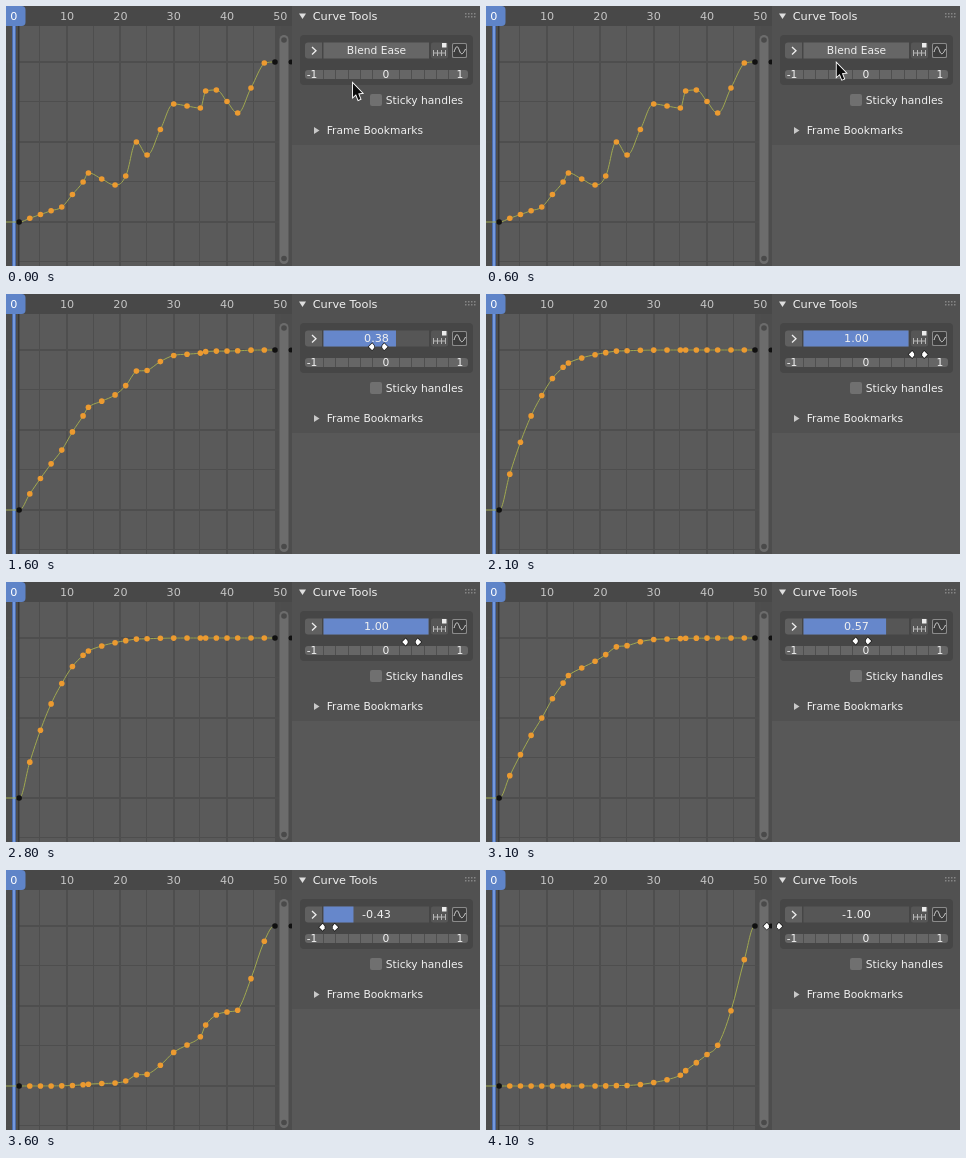
An HTML page with a canvas for the animation above (4200 ms loop, 474 by 260 pixels).

```html
<!DOCTYPE html>
<html>
<head>
<meta charset="utf-8">
<style>
html, body { margin: 0; width: 100%; height: 100%; overflow: hidden; background: #585858; }
canvas { display: block; }
</style>
</head>
<body>
<canvas id="stage" width="474" height="260"></canvas>
<script>
const c = document.getElementById('stage').getContext('2d');
const LOOP = 4200, STEP = 100, DRAG = 1100, TURN = 2200;
const LEFT = 13, BASE = 216, TOP = 56, SPAN = 48, UNIT = 53;

// bends of the curve: keyframe number, height above the base
const bends = [[1, 0], [9, 15], [13, 40], [14, 49], [19, 37], [21, 46], [23, 80], [25, 67],
  [30, 118], [35, 114], [36, 131], [38, 132], [42, 109], [47, 159], [49, 160]];

const mix = (a, b, k) => a + (b - a) * k;
const frameX = f => 7.8 + f * 5.33;

// keys sit on the bends and evenly between them, about two frames apart
const keys = bends.slice(1).flatMap(([f, h], i) => {
  const [f0, h0] = bends[i];
  const n = Math.round((f - f0) / 2.1) || 1;
  return Array.from({ length: n }, (_, j) => [mix(f0, f, j / n), BASE - mix(h0, h, j / n)]);
});
keys.push([SPAN + 1, TOP]);

function rect(x, y, w, h, fill, r = 0) {
  c.fillStyle = fill;
  c.beginPath();
  c.roundRect(x, y, w, h, r);
  c.fill();
}

function poly(points, fill, stroke, width = 1) {
  c.beginPath();
  points.forEach(p => c.lineTo(...p));
  if (fill) c.closePath();
  if (stroke) {
    c.strokeStyle = stroke;
    c.lineWidth = width;
    c.stroke();
  }
  if (fill) {
    c.fillStyle = fill;
    c.fill();
  }
}

function dot(x, y, r, fill) {
  c.fillStyle = fill;
  c.beginPath();
  c.arc(x, y, r, 0, 7);
  c.fill();
}

function text(s, x, y, size = 10.7, align = 'left', fill = '#f0f0f0') {
  c.font = size + 'px "DejaVu Sans", sans-serif';
  c.textAlign = align;
  c.fillStyle = fill;
  c.fillText(s, x, y);
}

function ease(t, from, to, power = 1) {
  const k = Math.max(0, Math.min(1, (t - from) / (to - from))) ** power;
  return k * k * (3 - 2 * k);
}

// approach the slider, drag right, then drag back to the left
function pointerAt(t) {
  if (t < DRAG) {
    const k = ease(t, 0, 900);
    return [mix(347, 352, k), mix(77.5, 50, k)];
  }
  if (t < TURN) {
    const k = ease(t, DRAG, TURN, 1.45);
    return [mix(352, 436, k), mix(50, 61, k)];
  }
  const k = ease(t, TURN, 4300);
  return [mix(436, 283, k), mix(61, 56, k)];
}

// half a sigmoid pulls each key towards the right or left neighbour
function blend([frame, y], factor) {
  const t = (frame - 1) / SPAN;
  const x = frameX(frame);
  if (t === 0 || t === 1) return [x, y];
  const s = factor < 0 ? 1 - t : t;
  const pull = 2 / (1 + ((1 + s) / (1 - s)) ** (5 * Math.abs(factor)));
  return [x, mix(factor < 0 ? BASE : TOP, y, pull)];
}

function slope(p, i) {
  if (!i || i === p.length - 1) return 0;
  const [a, b, d] = [p[i - 1], p[i], p[i + 1]];
  if ((b[1] - a[1]) * (d[1] - b[1]) <= 0) return 0;
  return (d[1] - a[1]) / (d[0] - a[0]);
}

function drawCurve(factor) {
  const p = keys.map(k => blend(k, factor));
  c.beginPath();
  c.moveTo(0, BASE);
  c.lineTo(...p[0]);
  for (let i = 1; i < p.length; i++) {
    const [a, b] = [p[i - 1], p[i]];
    const h = (b[0] - a[0]) * 0.39;
    const clamp = y => Math.max(Math.min(a[1], b[1]), Math.min(Math.max(a[1], b[1]), y));
    c.bezierCurveTo(a[0] + h, clamp(a[1] + slope(p, i - 1) * h),
      b[0] - h, clamp(b[1] - slope(p, i) * h), ...b);
  }
  c.strokeStyle = '#a0a850';
  c.lineWidth = 1;
  c.stroke();
  p.forEach(([x, y], i) => dot(x, y, 2.8, i && i < p.length - 1 ? '#ec9a30' : '#101010'));
}

function drawGraph(factor) {
  rect(0, 0, 286, 260, '#4d4d4d');
  rect(LEFT, 20, 256, 240, '#5a5a5a');
  for (let f = 5; f <= 50; f += 5) rect(Math.round(frameX(f)) - 1, 20, f % 10 ? 1 : 2, 240, '#4e4e4e');
  for (let i = 0; i < 6; i++) rect(0, TOP + i * 40 - 1, 274, i % 2 ? 1 : 2, '#4e4e4e');
  rect(LEFT - 1, 20, 1.5, 240, '#383838');
  rect(0, 0, 286, 20, '#484848');
  for (let f = 10; f <= 50; f += 10) text(f, frameX(f), 13.5, 11.2, 'center', '#c4c4c4');
  rect(6, 18, 4, 242, '#4c6cab');
  rect(7, 18, 2, 242, '#7398de');
  rect(0, 0, 19.5, 20, '#5f84c8', [0, 4, 4, 0]);
  text('0', 7.8, 13.5, 11.2, 'center', '#fff');
  drawCurve(factor);
  rect(273.5, 29, 9, 229, '#6c6c6c', 4.5);
  for (const y of [34, 252.5]) dot(278, y, 2.8, '#4a4a4a');
  dot(285, TOP, 2.5, '#101010');
}

function drawSlider(dragging, factor) {
  rect(317.5, 36.5, 105.5, 16, dragging ? '#565656' : '#666');
  if (dragging) rect(317.5, 36.5, 52.5 * (1 + factor), 16, '#6687cb');
  text(dragging ? factor.toFixed(2) : 'Blend Ease', 370.5, 48.3, dragging ? 11.2 : 10.7, 'center');
}

function drawIcons() {
  rect(425, 36.5, 17, 16, '#565656', 2);
  for (let x = 427; x < 441; x += 4) rect(x, 44, 1, 6, '#b5b5b5');
  rect(427, 46.5, 13, 1, '#b5b5b5');
  rect(436, 37, 4.5, 4.5, '#ececec');

  rect(446, 37, 15, 15, '#8a8a8a', 1.5);
  rect(447, 38, 13, 13, '#3c3c3c', 1);
  c.beginPath();
  c.moveTo(448, 46);
  c.bezierCurveTo(451, 37, 452, 41, 454, 46);
  c.bezierCurveTo(456, 50, 458, 46, 459.5, 43);
  c.strokeStyle = '#d8d8d8';
  c.lineWidth = 1;
  c.stroke();
}

function drawPanel(dragging, factor) {
  rect(286, 0, 188, 260, '#585858');
  rect(286, 0, 188, 139, '#515151');
  poly([[293, 7.5], [300, 7.5], [296.5, 13]], '#dedede');
  text('Curve Tools', 306.7, 14, 11.3);
  for (let i = 0; i < 8; i++) rect(459 + (i % 4) * 3, i < 4 ? 7 : 10, 1.5, 1.5, '#858585');

  rect(294, 29, 173, 50, '#464646', 4);
  rect(299, 36.5, 17, 16, '#606060', [3, 0, 0, 3]);
  poly([[306, 41], [310, 44.7], [306, 48.5]], null, '#eee', 1.3);
  drawSlider(dragging, factor);
  drawIcons();

  rect(299, 64, 163, 9, '#666', 3);
  for (let i = 0; i < 5; i++) {
    for (const x of [317, 393]) rect(Math.round(x + i * 12.25), 64, 1, 9, '#4f4f4f');
  }
  for (const n of [-1, 0, 1]) text(n, 380 + n * 74, 72, 10.7, 'center');

  rect(364, 88, 12, 12, '#707070', 2);
  text('Sticky handles', 379.7, 98);
  poly([[308, 121], [313.5, 124.5], [308, 128]], '#c8c8c8');
  text('Frame Bookmarks', 320.7, 128.3);
}

function drawPointer(dragging, x, y) {
  c.save();
  c.translate(x, y);
  if (dragging) {
    for (const s of [-1, 1]) {
      poly([[s * 9.5, 0], [s * 6, -3.5], [s * 4, -1], [s * 4, 1], [s * 6, 3.5]], '#fff', '#151515', 1.3);
    }
  } else {
    poly([[0, 0], [0, 13.5], [3, 10.8], [5.3, 16.5], [7.4, 15.6], [5.2, 10], [9.2, 9.6]], '#0c0c0c', '#fff', 1.8);
  }
  c.restore();
}

function draw(now) {
  const t = Math.floor(now % LOOP / STEP) * STEP;
  const dragging = t >= DRAG;
  const [x, y] = pointerAt(t);
  const zero = t < TURN ? 352 : 345.4;
  const factor = dragging ? Math.max(-1, Math.min(1, (x - zero) / UNIT)) : 0;
  drawGraph(factor);
  drawPanel(dragging, factor);
  drawPointer(dragging, x, y);
}

const start = performance.now();
function tick() {
  draw(performance.now() - start);
  requestAnimationFrame(tick);
}
tick();
</script>
</body>
</html>
```
